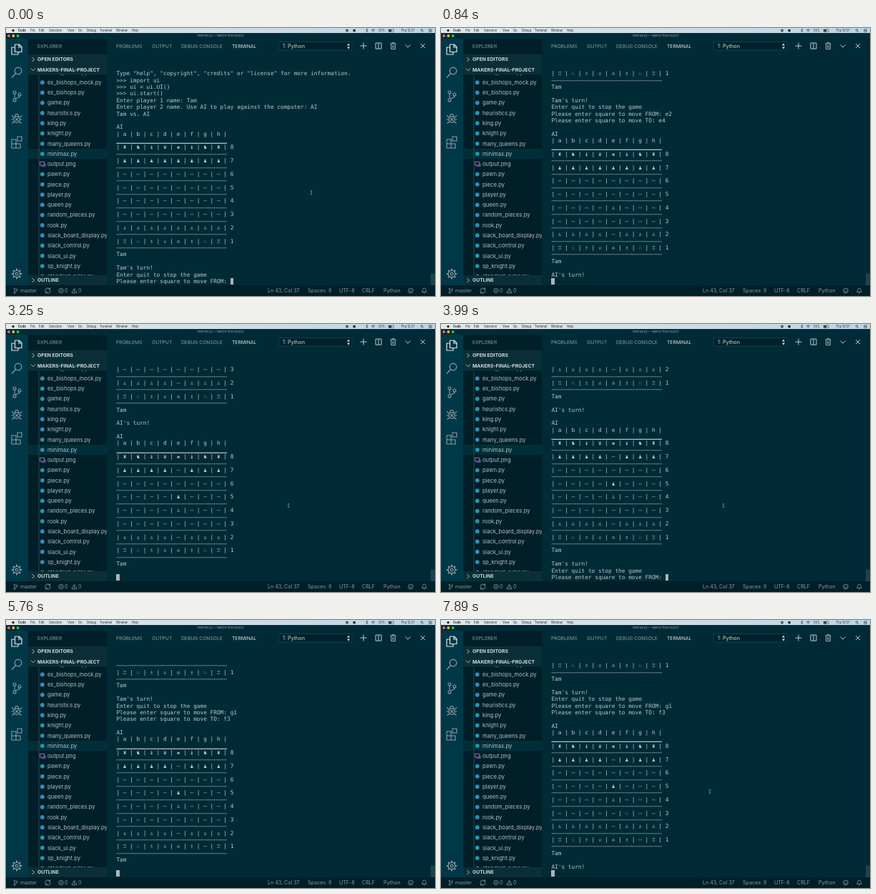
Animation, 600 px wide and 375 px high, one loop 8 s. Source, as an HTML page:

```html
<!DOCTYPE html>
<html lang="en">
<head>
<meta charset="utf-8">
<title>Chess in the terminal</title>
<style>
  html, body { margin: 0; width: 100%; height: 100%; overflow: hidden; background: #002b36; }
  svg { position: absolute; left: 0; top: 0; font-family: Inter, Roboto, sans-serif; }
  pre {
    position: absolute; left: 154.4px; top: 59.3px; margin: 0;
    font: 7.79px/9.37px "DejaVu Sans Mono", monospace;
    font-variant-emoji: text; color: #bcc8c9;
  }
  pre i { display: inline-block; width: 1ch; height: 9.3px; vertical-align: top; background: #a9b6b8; }
</style>
</head>
<body>
<svg id="ui" width="600" height="375" viewBox="0 0 600 375"></svg>
<pre><span id="log"></span><i></i></pre>
<svg width="600" height="375"><path id="mouse" d="M-1.2-2.6Q0-2.6 0-1.8Q0-2.6 1.2-2.6M0-1.8V1.8M-1.2 2.6Q0 2.6 0 1.8Q0 2.6 1.2 2.6" fill="none" stroke="#b3c0c3" stroke-width=".6"/></svg>
<script>
const BG = '#002b36', SIDE = '#001f28', BAR = '#003847', HEAD = '#0a2f39';
const TEXT = '#b0bdc0', DIM = '#8a9ca1', BRIGHT = '#dbe3e4';

// ---------- static window ----------
const rect = (x, y, w, h, fill, more = '') =>
  `<rect x="${x}" y="${y}" width="${w}" height="${h}" fill="${fill}" ${more}/>`;
const dot = (x, y, r, fill) => `<circle cx="${x}" cy="${y}" r="${r}" fill="${fill}"/>`;
const line = (d, color = DIM, w = 1) =>
  `<path d="${d}" fill="none" stroke="${color}" stroke-width="${w}"/>`;
const at = (x, y, body) => `<g transform="translate(${x} ${y})">${body}</g>`;
const text = (x, cy, size, fill, str, more = '') =>
  `<text x="${x}" y="${cy + size * .36}" font-size="${size}" fill="${fill}" ${more}>${str}</text>`;
const ring = (x, y, r) => `M${x - r} ${y}a${r} ${r} 0 1 0 ${2 * r} 0a${r} ${r} 0 1 0 ${-2 * r} 0`;
const bold = 'font-weight="700"';

function menuBar() {
  const items = [[17, 'Code'], [34, 'File'], [46, 'Edit'], [60, 'Selection'], [86, 'View'],
    [101, 'Go'], [113, 'Debug'], [131, 'Terminal'], [154, 'Window'], [176, 'Help']];
  const ink = '#1c2224';
  return '<linearGradient id="sky"><stop stop-color="#e2e8ea"/><stop offset="1" stop-color="#bdd3e4"/></linearGradient>' +
    rect(0, 0, 600, 7, 'url(#sky)') + dot(10, 3.4, 1.7, ink) +
    items.map(([x, s], i) => text(x, 3.5, 4.2, ink, s, i ? '' : bold)).join('') +
    line(ring(477, 3.5, 1.7), ink, .7) + dot(477, 3.5, .9, ink) + rect(485.5, 1.9, 3.2, 3.2, ink) +
    line('M503.5 2.3l2.4 2.4-1.2 1.2v-5l1.2 1.2-2.4 2.4', ink, .5) +
    line('M511 2.9q2.5-2 5 0M512 4.2q1.5-1.2 3 0M513.1 5.4h.8', ink, .7) +
    text(521, 3.5, 4.2, ink, '55%') + rect(535, 2, 7, 3.2, 'none', `stroke="${ink}" stroke-width=".5"`) +
    rect(535.5, 2.4, 3.6, 2.4, ink) + text(552.5, 3.5, 4.2, ink, 'Thu 12:57') +
    line(ring(581.5, 3, 1.3) + 'M582.5 4l1.6 1.6', ink, .6) +
    line('M591 2h5M591 3.6h5M591 5.2h5', ink, .6) +
    rect(0, 7, 600, 8, '#002c39') +
    ['#ff5f57', '#febc2e', '#28c840'].map((c, i) => dot(4 + i * 6.3, 11, 1.9, c)).join('') +
    text(300, 11, 3.9, '#93a4a8', 'minimax.py — makers-final-project', 'text-anchor="middle"');
}

function activityBar() {
  const legs = 'M-4-2l-3-2.5M4-2l3-2.5M-4.3 1h-3M4.3 1h3M-3.5 4l-3 2.5M3.5 4l3 2.5';
  let gear = '';
  for (let a = 0; a < 8; a++) gear += `<path d="M0-4.8V-7.2" transform="rotate(${a * 45})"/>`;
  return rect(0, 15, 31, 345, BAR) +
    at(15, 30, line('M-2.5-7h6l3.5 3.5v7h-9.5zM3-7v4h4M-3-3h-4v10h9v-3', BRIGHT, 1.2)) +
    at(15, 62, line(ring(2, -2, 4.8) + 'M-1.5 1.5l-5.5 6', DIM, 1.2)) +
    at(15, 95, line(ring(-3, -5, 2) + ring(-3, 6, 2) + ring(4, -2, 2) + 'M-3-3v7M4 0q0 3-6 3.5', DIM, 1.1)) +
    at(15, 127, line(ring(0, 1, 4.3) + 'M-2.5-3q0-3.500 2.5-3.5t2.5 3.5M-2-1l4 4M2-1l-4 4' + legs, DIM, 1.1)) +
    at(15, 160, line('M-7-4h6v12h-6zM-7 2h12v6h-12M1-8h6v6h-6z', DIM, 1.1)) +
    at(15, 344, line(ring(0, 0, 4.8) + ring(0, 0, 1.9), DIM, 1.1) +
      `<g stroke="${DIM}" stroke-width="2">${gear}</g>`);
}

function sidebar() {
  const files = ('even_pieces ex_bishops_mock ex_bishops game heuristics king knight many_queens minimax ' +
    'output.png pawn piece player queen random_pieces rook slack_board_display slack_control ' +
    'slack_ui sp_knight standard_rules').split(' ');
  const row = (name, i) => {
    const y = 61.9 + i * 14.27, image = name.endsWith('.png');
    const icon = image
      ? rect(47.5, y - 3, 6, 4.5, 'none', 'stroke="#8d78c4" stroke-width=".9"') +
        line(`M49 ${y + 3}h6v-4`, '#8d78c4', .9)
      : dot(50.8, y, 2.9, '#2f8fb5');
    return icon + text(58, y, 7.7, TEXT, image ? name : name + '.py');
  };
  const section = (y, d, s) => rect(31, y - 7.1, 110, 14.2, HEAD) +
    line(`M38 ${y}` + d, TEXT, 1) + text(44, y, 6.8, '#cfd9da', s, bold);
  return rect(31, 15, 110, 345, SIDE) + text(44, 25.3, 6.7, DIM, 'EXPLORER') +
    '<clipPath id="side"><path d="M31 65h110v281H31z"/></clipPath><g clip-path="url(#side)">' +
    rect(31, 169, 110, 14.2, '#002f3a') + line('M46 65V346', '#4a646b', .6) +
    files.map(row).join('') + '</g>' +
    section(44, 'm-1.5-3l3 3-3 3', 'OPEN EDITORS') +
    section(58.2, 'm-3-1.5l3 3 3-3', 'MAKERS-FINAL-PROJECT') +
    section(353, 'm-1.5-3l3 3-3 3', 'OUTLINE');
}

function panel() {
  const tabs = [[154, 'PROBLEMS'], [204, 'OUTPUT'], [245, 'DEBUG CONSOLE'], [316, 'TERMINAL']];
  const ink = '#bdc9cc';
  return rect(141, 15, 459, 345, BG) +
    tabs.map(([x, s], i) => text(x, 25.3, 6.75, i == 3 ? BRIGHT : DIM, s)).join('') +
    rect(381.4, 19.4, 102.5, 11.6, '#00212b', 'rx="1" stroke="#1a5560" stroke-width=".6"') +
    text(387, 25.3, 7.2, '#d3dcdd', '1: Python') +
    `<path d="M477 24.5l2-3 2 3zM477 26.5l2 3 2-3z" fill="${BRIGHT}"/>` +
    at(500, 25, line('M-4.5 0h9M0-4.5v9', ink)) +
    at(521, 25, line('M-4-4h8v8h-8zM0-4v8', ink)) +
    at(541.5, 25, line('M-4-3h8M-1.5-3v-1.5h3v1.5M-3-3v7.5h6v-7.5M-1-1v4M1-1v4', ink, .8)) +
    at(562, 25, line('M-3.5-1.5l3.5 3.5 3.5-3.5', ink)) +
    at(583, 25, line('M-3-3l6 6M3-3l-6 6', ink)) +
    rect(594, 343.5, 6, 16.5, '#1b434d');
}

function statusBar() {
  const items = [[20, 'master'], [82, '0'], [101, '0'], [366, 'Ln 43, Col 37'], [422, 'Spaces: 8'],
    [466, 'UTF-8'], [498, 'CRLF'], [528, 'Python']];
  return rect(0, 360, 600, 15, SIDE) +
    items.map(([x, s]) => text(x, 367.5, 7.1, DIM, s)).join('') +
    at(13.5, 367.5, line(ring(-1.5, -2.5, 1) + ring(-1.5, 3, 1) + ring(2, -1.5, 1) + 'M-1.5-1.5v3.5M2-.5q0 2-3 2', DIM, .7)) +
    at(58.5, 367.5, line('M-3.5 1a3.5 3.5 0 0 1 6-3.3M3.5-1a3.5 3.5 0 0 1-6 3.3M1-2h2v-2M-1 2h-2v2', DIM, .9)) +
    at(77, 367.5, line(ring(0, 0, 3.2) + 'M-1.3-1.3l2.6 2.6M1.3-1.3l-2.6 2.6', DIM, .8)) +
    at(95.5, 367.5, line('M0-3.3l3.6 6.5h-7.2zM0-1v2M0 1.7v.8', DIM, .8)) +
    at(566, 367.5, line(ring(0, 0, 3.4) + 'M-1.8.8q1.8 2 3.6 0M-1.3-1.5v1M1.3-1.5v1', DIM, .8)) +
    at(585, 367.5, line('M-3.3 2q1.3-1 1.3-3.5 0-2 2-2t2 2q0 2.5 1.3 3.5zM-.8 3.5h1.6', DIM, .8));
}

document.getElementById('ui').innerHTML =
  panel() + sidebar() + activityBar() + statusBar() + menuBar();

// ---------- the game ----------
const PLAYER = 'Tam', ROWS = 32, LOOP = 8000, EMPTY = '–';
const grid = ['♜♞♝♛♚♝♞♜', '♟'.repeat(8), ...Array(4).fill(EMPTY.repeat(8)),
  '♙'.repeat(8), '♖♘♗♕♔♗♘♖'].map(r => [...r]);
const rule = EMPTY.repeat(33);
const cells = list => '| ' + list.join(' | ') + ' |';

function board(from, to) {
  if (from) {
    const spot = s => [8 - s[1], 'abcdefgh'.indexOf(s[0])];
    const [r, c] = spot(from), [r2, c2] = spot(to);
    grid[r2][c2] = grid[r][c];
    grid[r][c] = EMPTY;
  }
  return ['AI', cells([...'abcdefgh']), '▁'.repeat(33),
    ...grid.flatMap((r, i) => [`${cells(r)} ${8 - i}`, rule]), PLAYER].join('\n') + '\n\n';
}

const ask = way => `Please enter square to move ${way}: `;
const turn = `${PLAYER}'s turn!\nEnter quit to stop the game\n` + ask('FROM');
const intro = `Type "help", "copyright", "credits" or "license" for more information.
>>> import ui
>>> ui = ui.UI()
>>> ui.start()
Enter player 1 name: ${PLAYER}
Enter player 2 name. Use AI to play against the computer: AI
${PLAYER} vs. AI

`;

// [time, output appended at that time]
const output = [
  [0, intro + board() + turn],
  [90, 'e'], [190, '2'], [460, '\n' + ask('TO')], [560, 'e'], [650, '4'],
  [740, '\n\n' + board('e2', 'e4')], [840, "AI's turn!\n"],
  [3250, '\n' + board('e7', 'e5')], [3340, turn],
  [4360, 'g'], [4460, '1'], [5290, '\n' + ask('TO')], [5570, 'f3'],
  [5760, '\n\n' + board('g1', 'f3')], [5850, "AI's turn!\n"],
];

// [shown from, hidden at, glide duration, start, end]
const glides = [
  [0, 90, 1, [427, 230], [427, 230]],
  [1110, 4360, 280, [427, 230], [395, 254]],
  [5940, LOOP, 370, [395, 254], [376, 240]],
];

const log = document.getElementById('log'), mouse = document.getElementById('mouse');

function draw(now) {
  const t = now % LOOP;
  const all = output.filter(([time]) => time <= t).map(([, s]) => s).join('');
  const view = all.split('\n').slice(-ROWS).join('\n');
  if (log.textContent !== view) log.textContent = view;

  const glide = glides.find(([on, off]) => t >= on && t < off);
  mouse.style.display = glide ? '' : 'none';
  if (glide) {
    const [on, , span, a, b] = glide, k = Math.min(1, (t - on) / span);
    const e = k * (2 - k);
    mouse.setAttribute('transform', `translate(${a.map((v, i) => v + (b[i] - v) * e)})`);
  }
}

const start = performance.now();
function tick(now) {
  draw(Math.max(0, now - start));
  requestAnimationFrame(tick);
}
requestAnimationFrame(tick);
</script>
</body>
</html>
```
